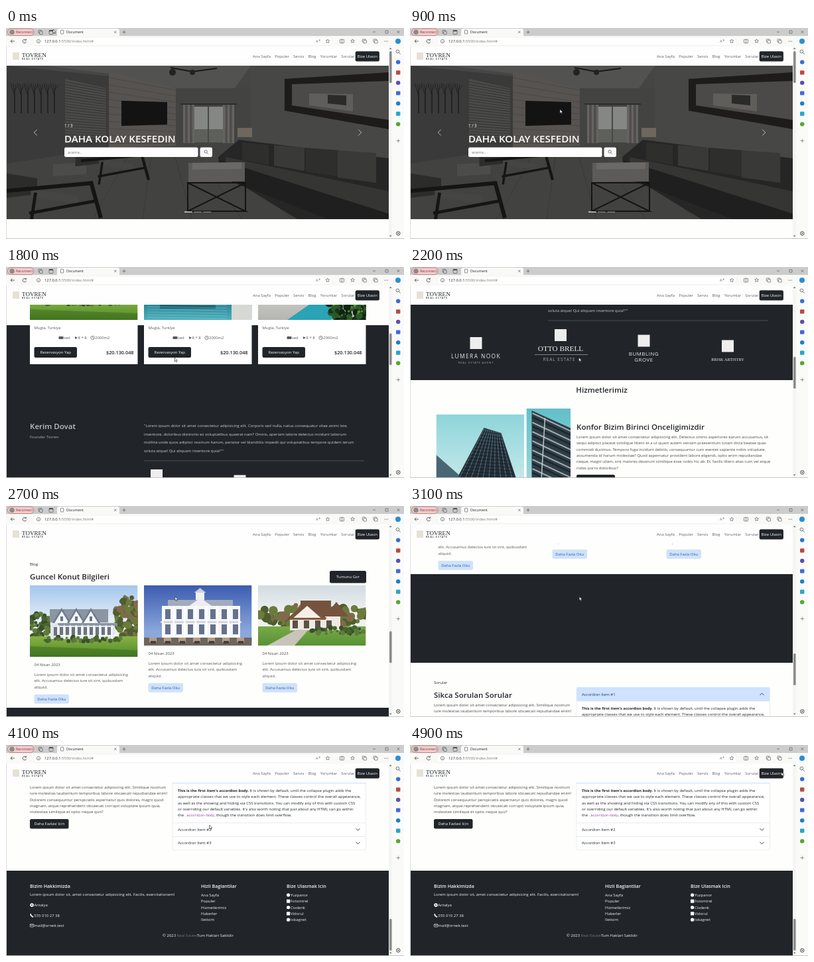
Animation of 600x319 px, one loop 5000 ms. Source, as an HTML page with a canvas:

```html
<!DOCTYPE html>
<html lang="tr">
<head>
<meta charset="utf-8">
<title>Document</title>
<style>
html, body { margin: 0; width: 100%; height: 100%; overflow: hidden; background: #fefefc; }
canvas { display: block; width: 600px; height: 319px; }
</style>
</head>
<body>
<canvas id="stage"></canvas>
<script>
const W = 600, H = 319, LOOP = 5000, STEP = 100;
const canvas = document.getElementById('stage');
const dpr = window.devicePixelRatio || 1;
canvas.width = W * dpr;
canvas.height = H * dpr;
const g = canvas.getContext('2d');

const SANS = '"Open Sans", "Noto Sans", sans-serif';
const SERIF = '"Liberation Serif", "Noto Serif", serif';
const MONO = '"Liberation Mono", monospace';
const INK = '#212529', SOFT = '#45494d', LINK = '#123c7c';
const GREEN = ['#49642f', '#5f7c3c', '#39502a'], AUTUMN = ['#6a7b3c', '#82694a', '#4d5f2e'], SHADE = ['#17331a', '#2c5a24', '#0f2412'];
const BODY = 5.95, LEAD = 9.35;
const cols = [36, 208, 380];

// [time, scroll offset]
const scrollKeys = [[900, 0], [1300, 161], [1800, 390], [2200, 602], [2700, 921], [3500, 1325], [3600, 1360]];
// [time, x, y]
const mouseKeys = [[500, 71, 2], [900, 226, 123], [1300, 226, 123], [1600, 254, 137], [4000, 256, 137], [4600, 560, 41]];

function track(keys, t) {
  let i = 1;
  while (i < keys.length - 1 && keys[i][0] < t) i++;
  const a = keys[i - 1], b = keys[i];
  const k = Math.max(0, Math.min(1, (t - a[0]) / (b[0] - a[0])));
  return a.slice(1).map((v, n) => v + (b[n + 1] - v) * k);
}

function rect(c, x, y, w, h) { g.fillStyle = c; g.fillRect(x, y, w, h); }
function round(c, x, y, w, h, r = 2.3, edge) {
  g.beginPath(); g.roundRect(x, y, w, h, r);
  if (c) { g.fillStyle = c; g.fill(); }
  if (edge) { g.strokeStyle = edge; g.lineWidth = 0.6; g.stroke(); }
}
function path(pts) {
  g.beginPath();
  for (let i = 0; i < pts.length; i += 2) g.lineTo(pts[i], pts[i + 1]);
}
function poly(c, ...pts) { path(pts); g.fillStyle = c; g.fill(); }
function line(c, w, ...pts) { path(pts); g.strokeStyle = c; g.lineWidth = w; g.stroke(); }
function dot(c, x, y, r) { g.beginPath(); g.arc(x, y, r, 0, 7); g.fillStyle = c; g.fill(); }
function ring(c, x, y, r, w = 0.7) { g.beginPath(); g.arc(x, y, r, 0, 7); g.strokeStyle = c; g.lineWidth = w; g.stroke(); }
function fade(y0, y1, ...cs) {
  const f = g.createLinearGradient(0, y0, 0, y1);
  cs.forEach((c, i) => f.addColorStop(i / (cs.length - 1), c));
  return f;
}
// a wall in perspective: the right edge is moved by top and bottom
function slab(c, x, y, w, h, top = 0, bottom = top) { poly(c, x, y, x + w, y + top, x + w, y + h + bottom, x, y + h); }
function gable(c, x, y, half, h) { poly(c, x - half, y, x, y - h, x + half, y); }
function repeat(n, fn) { for (let i = 0; i < n; i++) fn(i); }
function grid(c, x, y, nx, ny, dx, dy, w, h) { repeat(nx * ny, i => rect(c, x + i % nx * dx, y + Math.floor(i / nx) * dy, w, h)); }
function leaves(colors, n, x, y, w, h, r) {
  let seed = n * 97 + 13;
  const rnd = () => (seed = (seed * 16807) % 2147483647) / 2147483647;
  repeat(n, i => {
    const a = rnd() * 6.283, d = Math.sqrt(rnd()) / 2;
    dot(colors[i % colors.length], x + w * (0.5 + Math.cos(a) * d), y + h * (0.5 + Math.sin(a) * d), r * (0.5 + rnd() * 0.7));
  });
}
function photo(x, y, w, h, draw) {
  g.save();
  g.beginPath(); g.rect(x, y, w, h); g.clip();
  g.translate(x, y);
  draw(w, h);
  g.restore();
}

// y is the middle of the capitals; returns the right end
function text(s, x, y, { size = BODY, color = INK, weight = 400, align = 'left', font = SANS, space = 0 } = {}) {
  g.font = `${weight} ${size}px ${font}`;
  g.letterSpacing = space + 'px';
  g.textAlign = align;
  g.fillStyle = color;
  g.fillText(s, x, y + size * 0.35);
  return x + g.measureText(s).width;
}
function lines(list, x, y, step = LEAD, style) { list.forEach((s, i) => text(s, x, y + i * step, style)); }
function title(s, x, y, o = {}) { text(s, x, y, { size: 11.55, weight: 600, ...o }); }
function button(s, x, y, w, h = 14.5, back = INK, color = '#fff') {
  round(back, x, y, w, h);
  text(s, x + w / 2, y + h / 2, { color, align: 'center' });
}
function glass(x, y, r, c = SOFT) {
  ring(c, x - 0.6, y - 0.6, r);
  line(c, 0.8, x + r * 0.5, y + r * 0.5, x + r * 1.5, y + r * 1.5);
}
function chevron(x, y, turn, size, c = INK) {
  g.save(); g.translate(x, y); g.rotate(turn * Math.PI / 2);
  line(c, 0.9, -size, -size / 2, 0, size / 2, size, -size / 2);
  g.restore();
}

function farmhouse(w, h) {
  rect(fade(0, 60, '#a3c6ee', '#eef3f8'), 0, 0, w, h);
  leaves(AUTUMN, 110, 128, 16, 42, 64, 5);
  leaves(GREEN, 60, -10, 42, 42, 38, 4);
  rect(fade(78, h, '#86b043', '#4f8a28'), 0, 77, w, h);
  slab('#8b95a3', 30, 36, 88, 24);
  rect('#e2e6ec', 31, 56, 97, 25);
  repeat(3, i => {
    const x = 48 + i * 22;
    gable('#717d8d', x, 57, 14, 23);
    gable('#f6f7f8', x, 57, 11, 18);
    rect('#66758a', x - 2, 47, 4, 7);
  });
  slab('#8b97a5', 42, 57, 90, 4);
  grid('#6c757f', 36, 63, 10, 1, 9, 0, 5, 13);
  grid('#fff', 42, 60, 10, 1, 9, 0, 1.4, 21);
  rect('#fff', 42, 75, 88, 1.2);
  leaves(GREEN, 50, 16, 77, 126, 9, 3);
  slab('rgba(30,70,15,.3)', 0, 92, w, h, 6);
}
function villa(w, h) {
  rect(fade(0, 76, '#4f95da', '#c2def3'), 0, 0, w, h);
  leaves(GREEN, 30, -8, 44, 30, 30, 4);
  rect('#dfe3e6', 108, 4, 20, 72);
  repeat(2, i => {
    const y = 12 + i * 28;
    rect('#56656e', 22, y + 6, 88, 26);
    slab('#a05a48', 24, y + 4, 84, 8, 0, -2);
    slab('#fafafa', 14, y - 2, 122, 7, -2, 0);
    grid('#f5f5f5', 22, y + 4, 4, 1, 27, 0, 3, 26);
  });
  rect('#dfe3e5', 128, 44, 34, 30);
  repeat(8, i => rect('#9ba3a7', 130 + i * 4, 70 - i * 4, 9, 1.2));
  rect('#dad9d3', 0, 70, w, 6);
  rect(fade(74, h, '#1b7484', '#4fb0bd'), 0, 75, w, h);
  slab('rgba(10,70,85,.55)', 24, 75, 84, 16);
  slab('#d6d8d3', 132, 75, 30, 34);
  repeat(7, i => line('rgba(200,240,244,.35)', 0.8, 5, 80 + i * 4, 125, 82 + i * 4));
}
function terrace(w, h) {
  rect(fade(0, 62, '#8bb8e8', '#eef3f8'), 0, 0, w, h);
  leaves(GREEN, 40, -8, 42, 55, 24, 4);
  repeat(2, i => { line('#6d614f', 1, 14 + i * 16, 60, 14 + i * 16, 32); leaves(GREEN, 14, 7 + i * 16, 25, 14, 9, 2.5); });
  slab('#e9eaea', 44, 30, 72, 36, -4, 0);
  slab('#fff', 40, 29, 84, 5, -4);
  rect('#48545a', 52, 38, 60, 25);
  grid('#d4d7d7', 52, 36, 6, 1, 12, 0, 1.5, 28);
  rect(fade(62, h, '#d3d2cd', '#b4b5b0'), 0, 63, w, h);
  poly('#2aa3b5', 84, 80, 122, 88, 110, h, 44, h);
  leaves(SHADE, 190, 106, 44, 62, 74, 5);
  leaves(['#5c9438'], 40, 110, 50, 52, 56, 1.6);
}
function colonial(w, h) {
  rect(fade(0, 70, '#3c5cb0', '#8ba7dc'), 0, 0, w, h);
  rect('#f0f1f4', 78, 10, 13, 16);
  gable('#cdd0d8', 84.5, 11, 9, 7);
  slab('#a4abb9', 36, 22, 98, 12);
  gable('#eceef2', 85, 31, 17, 12);
  rect('#f5f6f8', 27, 31, 118, 49);
  grid('#65718d', 32, 36, 7, 2, 17, 23, 8, 15);
  rect('#d3d7df', 25, 54, 122, 3);
  grid('#fff', 27, 31, 8, 1, 16.5, 0, 2.5, 49);
  rect('#6c665f', 0, 79, w, 12);
  grid('#b49b85', 8, 79, 8, 1, 22, 0, 11, 7);
  grid('#473d3a', 10, 84, 8, 1, 22, 0, 8, 4);
}
function chalet(w, h) {
  rect(fade(0, 40, '#d2dbe1', '#eef1f0'), 0, 0, w, h);
  leaves(AUTUMN, 120, -10, 29, 182, 34, 6);
  rect(fade(60, h, '#7cab48', '#579235'), 0, 62, w, h);
  rect('#eeeae2', 48, 42, 76, 26);
  slab('#76533f', 64, 23, 46, 24);
  gable('#76533f', 118, 47, 18, 22);
  gable('#76533f', 74, 50, 30, 26);
  gable('#f4f0e8', 74, 52, 24, 21);
  grid('#5c5147', 52, 53, 4, 1, 17, 0, 8, 12);
  rect('#86583c', 48, 49, 54, 3);
  poly('#c9c4b9', 58, 67, 76, 67, 55, h, 14, h);
  leaves(GREEN, 45, 80, 63, 80, 12, 3.5);
}
function tower(w, h) {
  rect(fade(0, h, '#8ed5da', '#d7eff0'), 0, 0, w, h);
  poly('#243039', 72, 20, 98, 28, w, h, 12, h);
  repeat(10, i => line('#7799a6', 0.7, 73 + i * 2.6, 21 + i * 0.7, 16 + i * 12, h));
  repeat(22, i => line('rgba(10,18,25,.6)', 1, 70 - i * 2.6, 26 + i * 5, 98 + i * 1.4, 30 + i * 5));
  slab('#496773', 0, 61, 34, h, 30);
}
function facade(w, h) {
  rect(fade(0, h, '#61bfc9', '#b3e0e2'), 0, 0, w, h);
  slab('#303d45', 8, 3, w, h, 30);
  repeat(11, i => repeat(2, k => line(k ? '#18242b' : '#9faeb1', 2, 9, 7 + i * 14 + k * 6, w, 34 + i * 14 + k * 6)));
  line('#bccacc', 1.5, 28, 14, 20, h);
}

function chair(x, y, k) {
  g.save(); g.translate(x, y); g.scale(k, k);
  slab('#2c2c2b', -50, -22, 50, 34, 8, -6);
  slab('#454544', -8, 0, 60, 10, 8);
  line('#151515', 5, -40, 2, 68, -8, 80, 36);
  line('#151515', 4, -10, 30, 76, 14);
  line('#151515', 4, -2, 4, -8, 44);
  g.restore();
}
function room(w, h) {
  rect(fade(0, h, '#474747', '#3d3d3d', '#323232'), 0, 0, w, h);
  poly('#525251', 60, 0, 368, 0, 344, 34, 255, 34, 154, 12);
  slab('#3a3a3a', 0, 0, 157, 150, 16, -24);
  slab('#4b4b4a', 88, 20, 62, 98, 14, -10);
  repeat(22, i => line('#393938', 1.4, 88, 24 + i * 4.2, 150, 36 + i * 3.7));
  slab('#565350', 154, 8, 101, 122, 26, -9);
  repeat(10, i => line('#474440', 0.7, 154, 18 + i * 11, 255, 37 + i * 9));
  slab('#131313', 173, 53, 69, 38, 2, -2);
  rect('#434342', 255, 34, 114, 90);
  rect('#858784', 280, 62, 50, 36);
  rect('#5d605b', 280, 96, 50, 20);
  line('#484846', 2, 304, 62, 304, 116);
  line('#242424', 1.4, 262, 58, 347, 58);
  repeat(2, i => repeat(5, n => slab(n % 2 ? '#4f4e4c' : '#656461', 266 + i * 60 + n * 3.4, 59, 3.4, 58)));
  slab('#474746', 368, 0, 208, 122, 0, 46);
  slab('#1d1c1b', 419, 20, 157, 48, -10, 28);
  slab('#4b4a48', 430, 28, 146, 32, -5, 22);
  slab('#605e5a', 456, 42, 66, 18, 1, 9);
  slab('#2a2a29', 484, 44, 28, 13, 1, 3);
  repeat(7, i => repeat(4, n => line('#222', 0.9, 12 + i * 10, 72, 12 + i * 10, 46 - n * 3, 6 + i * 10 + n * 4, 26 + n)));
  line('#191919', 2, 247, 3, 280, 9, 317, 4);
  repeat(2, i => dot('#222', 250 + i * 30, 10, 5 - i));
  poly('#424241', 0, 148, 157, 124, 352, 118, 460, h, 0, h);
  repeat(5, i => line('#363636', 0.7, 190 + i * 30, 124, 130 + i * 75, h));
  slab('#6f675c', 348, 94, 22, 14);
  // sofa
  poly('#262626', 319, 138, 350, 112, 577, 140, 577, h, 438, h, 321, 160);
  slab('#353534', 330, 138, 247, 18, 52, 68);
  slab('#1f1f1f', 320, 142, 257, 26, 82, 100);
  repeat(4, i => slab(i % 2 ? '#393938' : '#2e2e2d', 355 + i * 48, 116 + i * 4, 40 + i * 6, 26 + i * 5, 4, 8));
  // coffee table
  slab('#5c5b59', 274, 147, 85, 29, -1);
  slab('#6a6966', 280, 147, 74, 10, -1);
  repeat(2, i => line('#141414', 2, 273 + i * 87, 177, 360 - i * 87, 220, 273, 220 - i * 43, 360, 220 - i * 43));
  line('#141414', 2, 273, 177, 273, 220); line('#141414', 2, 360, 177, 360, 220);
  slab('#4c4c4a', 70, 149, 50, 18, -3);
  chair(146, 142, 0.85);
  chair(46, 187, 1.2);
}

function hero() {
  photo(1, 57, 576, 232, room);
  text('1 / 3', 88, 147.5, { color: '#fff', size: 6.2 });
  title('DAHA KOLAY KESFEDIN', 88, 168, { size: 15.1, color: '#fff' });
  round('#fefefe', 88, 180.5, 201.5, 14.5);
  text('arama..', 93, 187.5, { color: '#6c757d' });
  round('#f8f9fa', 292.5, 180.5, 18.5, 14.5);
  glass(301.8, 187.5, 2.1);
  chevron(44.5, 158, 1, 4.5, '#c9c9c9');
  chevron(533.5, 158, -1, 4.5, '#c9c9c9');
  repeat(3, i => rect(i ? '#929292' : '#fff', 269 + i * 14.2, 277.5, 11.7, 1.2));
}

function popular() {
  rect(INK, 1, 478, 576, 295);
  text('Populer', 36, 333);
  title('Populer Rezidanslarimiz', 36, 352);
  text('Tumunu Kesfedin', 482, 352.5, { weight: 600, size: 5.75 });
  line(INK, 0.8, 534, 352, 541.5, 352);
  chevron(541, 352, -1, 1.8);
  [farmhouse, villa, terrace].forEach((pic, i) => {
    const x = cols[i], c = '#55595d';
    rect('#fff', x, 362, 162.5, 175);
    photo(x, 362, 162.5, 108, pic);
    text('Mugla, Turkiye', x + 6.5, 482, { color: c });
    round(c, x + 43.5, 495, 6.5, 4, 0.8);
    text('bed', x + 50, 497, { color: c });
    poly(c, x + 68, 495, x + 72, 497, x + 68, 499);
    text('8 * 8', x + 72.5, 497, { color: c });
    ring(c, x + 94.5, 497, 2.7);
    line(c, 0.6, x + 94.5, 495, x + 94.5, 497, x + 96, 498);
    text('2000m2', x + 98, 497, { color: c });
    button('Rezervasyon Yap', x + 6.5, 511, 64.5, 16);
    text('$20.130.048', x + 156.5, 519, { size: 7.3, weight: 600, align: 'right' });
  });
}

function quote() {
  title('Kerim Dovat', 36, 631, { color: '#c1c3c4' });
  text('Founder Tovren', 36, 647, { color: '#adb0b2' });
  lines(['"Lorem ipsum dolor sit amet consectetur adipisicing elit. Corporis sed nulla, natus consequatur vitae animi iste,',
    'inventore, doloribus distinctio ex voluptatibus quaerat nam? Omnis, aperiam labore delectus incidunt laborum',
    'mollitia unde quos adipisci nostrum harum, pariatur vel blanditiis impedit qui voluptatibus tempore quidem terum',
    'soluta atque! Qui aliquam inventore quia?""'], 208, 630, 12.5, { color: '#cdcfd0', weight: 500 });
  rect('#565a5d', 208, 682.6, 332, 0.8);
}

function partner(x, y, name, sub, style) {
  const mid = { color: '#eee', align: 'center' };
  rect('#eee', x - 9, y - 29, 18, 18);
  text(name, x, y, { ...mid, size: 8.4, ...style });
  text(sub, x, y + 9, { ...mid, color: '#a6a8aa', size: 4.3, space: 0.8 });
}
function partners() {
  partner(99.5, 135, 'LUMERA NOOK', 'REAL ESTATE AGENT', { space: 1.4 });
  partner(227, 123, 'OTTO BRELL', '', { size: 11.3, font: SERIF });
  rect('#bbb', 188, 132, 80, 0.6);
  text('REAL ESTATE', 225, 139.5, { color: '#a6a8aa', size: 6.5, space: 1, align: 'center' });
  partner(352.5, 131.5, 'BUMBLING', '', { size: 7.8, space: 0.6 });
  text('GROVE', 352.5, 140, { color: '#eee', size: 7.8, space: 0.6, align: 'center' });
  partner(479, 139.5, 'BRISK ARTISTRY', '', { size: 6.2, font: SERIF });
}

function services() {
  title('Hizmetlerimiz', 289, 186, { align: 'center' });
  photo(39.5, 223, 132.5, 133, tower);
  photo(175.5, 214, 66.5, 150, facade);
  title('Konfor Bizim Birinci Onceligimizdir', 251, 241.5);
  lines(['Lorem ipsum dolor sit amet consectetur adipisicing elit. Delectus omnis asperiores earum accusamus, sit',
    'sequi adipisci placeat similique libero et a ut quam autem veniam praesentium totam dicta beatae quas',
    'commodi ducimus. Tempora fuga incidunt debitis, consequuntur cum eveniet sapiente nobis voluptate,',
    'assumenda id harum molestiae? Quod aspernatur provident labore eligendi, optio enim repudiandae',
    'neque, magni ullam, sint maiores deserunt similique esse nobis hic ab. Et, facilis libero alias cum vel atque',
    'nobis porro doloribus?'], 251, 257, LEAD, { color: SOFT });
  button('Daha Fazlasi Icin', 251, 314, 58);
}

function blog() {
  text('Blog', 36, 88);
  title('Guncel Konut Bilgileri', 36, 106.5);
  button('Tumunu Gor', 488, 98, 55, 18.5);
  [farmhouse, colonial, chalet].forEach((pic, i) => {
    const x = cols[i], h = i ? 91 : 108, y = 120 + h;
    photo(x, 120, 162.5, h, pic);
    text('04 Nisan 2023', x + 6.5, y + 11.5, { color: SOFT });
    lines(['Lorem ipsum dolor sit amet consectetur adipisicing', 'elit. Accusamus delectus iure sit sint, quibusdam', 'aliquid.'],
      x + 6.5, y + 27, LEAD, { color: '#55595d' });
    button('Daha Fazla Oku', x + 6.5, y + 56.8, 52.5, 14, '#cfe2fb', '#2a5fae');
  });
  rect(INK, 1, 305, 576, 134);
}

function faq() {
  text('Sorular', 36, 65);
  title('Sikca Sorulan Sorular', 36, 83.5);
  lines(['Lorem ipsum dolor sit amet consectetur adipisicing elit. Similique nostrum',
    'iure molestias laudantium temporibus labore obcaecati repudiandae enim!',
    'Dolorem consequuntur perspiciatis aspernatur quis dolores, magni quod',
    'magnam, atque reprehenderit obcaecati corrupti voluptate ipsum quia,',
    'molestiae similique et optio neque quo?'], 36, 99, LEAD, { color: SOFT });
  button('Daha Fazlasi Icin', 36, 147, 58.5);

  round('#fff', 251, 72, 291.5, 122, 2.4, '#dee2e6');
  round('#cfe2ff', 251.2, 72.2, 291, 21, [2.4, 2.4, 0, 0]);
  text('Accordion Item #1', 259, 82.8, { color: LINK });
  chevron(530.5, 82.5, 2, 3, LINK);
  const x = text("This is the first item's accordion body.", 259, 104, { weight: 700, size: 5.7 });
  text(' It is shown by default, until the collapse plugin adds the', x, 104);
  lines(['appropriate classes that we use to style each element. These classes control the overall appearance,',
    'as well as the showing and hiding via CSS transitions. You can modify any of this with custom CSS',
    "or overriding our default variables. It's also worth noting that just about any HTML can go within"], 259, 104 + LEAD);
  const y = 104 + 4 * LEAD;
  const a = text('the ', 259, y);
  const b = text('.accordion-body', a, y, { size: 4.9, color: '#8a3f96', font: MONO });
  text(', though the transition does limit overflow.', b, y);
  repeat(2, i => {
    const top = 152.5 + i * 20.5;
    rect('#dee2e6', 251, top, 291.5, 0.7);
    text('Accordion Item #' + (i + 2), 259, top + 10.4);
    chevron(530.5, top + 10.2, 0, 3);
  });
}

function footer() {
  const white = { color: '#f3f4f5' }, head = { ...white, size: 7.1, weight: 600 };
  rect(INK, 1, 225, 576, 130);
  ['Bizim Hakkimizda', 'Hizli Baglantilar', 'Bize Ulasmak Icin'].forEach((s, i) => text(s, i ? 165 + i * 129 : 36, 249, head));
  text('Lorem ipsum dolor sit, amet consectetur adipisicing elit. Facilis, exercitationem!', 36, 261.3, white);
  ring('#fff', 39, 277, 1.8, 1.8);
  line('#fff', 1.7, 37, 290.3, 37.8, 293, 41, 295.2);
  round(null, 36.3, 305.8, 5.5, 4.3, 0.7, '#fff');
  chevron(39, 307.3, 0, 2.2, '#fff');
  lines(['Antalya', '555 010 27 38', 'mail@ornek.test'], 42.3, 277, 15.6, white);
  lines(['Ana Sayfa', 'Populer', 'Hizmetlerimiz', 'Haberler', 'Iletisim'], 294, 261.8, LEAD, white);
  const social = ['Yuzpanor', 'Fotomirel', 'Civdenk', 'Vidorul', 'Isbagnet'];
  lines(social, 429, 261.8, LEAD, white);
  social.forEach((s, i) => round('#fff', 423, 259.2 + i * LEAD, 5.2, 5.2, i % 2 ? 0.4 : 2.6));
  let x = text('© 2023 ', 236, 323.3, white);
  x = text('Real Estate', x, 323.3, { color: '#6c757d' });
  text('Tum Haklari Saklidir', x, 323.3, white);
}

function navbar() {
  rect('#fefefe', 1, 28, 576, 29);
  rect('#e6e1d4', 10, 37, 10, 11);
  text('TOVREN', 24, 41, { size: 9.1, font: SERIF });
  text('REAL ESTATE', 24, 46.7, { size: 3.5, weight: 600, space: 1.1 });
  let x = 372;
  for (const s of ['Ana Sayfa', 'Populer', 'Servis', 'Blog', 'Yorumlar', 'Sorular']) x = text(s, x, 43, { color: '#5c6064' }) + 6.1;
  button('Bize Ulasin', 526.7, 35.2, 36.2, 15.4);
}

function cross(x, y, r, c, turn = 0) {
  g.save(); g.translate(x, y); g.rotate(turn);
  line(c, 0.6, -r, 0, r, 0); line(c, 0.6, 0, -r, 0, r);
  g.restore();
}
function star(x, y, r, c) {
  const pts = [];
  repeat(11, i => {
    const a = (i / 5 - 0.5) * Math.PI, q = i % 2 ? r * 0.5 : r;
    pts.push(x + q * Math.cos(a), y + q * Math.sin(a));
  });
  line(c, 0.6, ...pts);
}
function pages(x, y, c, back) {
  round(null, x, y, 4.6, 4.6, 0.8, c);
  round(back, x + 1.6, y + 1.6, 4.6, 4.6, 0.8, c);
}

function chrome(scroll) {
  const c = '#444', tabs = '#cbcccb', bar = '#f9f9f7';
  rect(tabs, 0, 0, W, 12);
  rect(bar, 0, 12, W, 16);
  round('#ecd0d0', 2.5, 1, 39.5, 10.5, 5.2, '#b8474b');
  dot('#8b8b8b', 9, 6.2, 3.8);
  text('Reconnect', 15, 6.3, { size: 5.2, color: '#a3282d' });
  pages(49, 3.3, c, tabs);
  round(null, 65, 3.5, 6, 6, 1, c); rect(c, 65, 3.5, 6, 1.6);
  round(bar, 77, 1, 94, 13, [3, 3, 0, 0]);
  round('#fff', 82.5, 3.3, 4.2, 5.6, 0.6, c);
  text('Document', 91, 6.4, { size: 5.3 });
  cross(164.8, 6.2, 2.3, c, Math.PI / 4);
  cross(178, 6.2, 2.5, c);
  line(c, 0.6, 553, 6, 557, 6);
  round(null, 572, 4, 4, 4, 0.4, c);
  cross(591.5, 6, 2.6, c, Math.PI / 4);

  round('#fff', 41, 14, 451, 12.5, 5, '#ececea');
  line(c, 0.8, 13, 20, 7, 20); chevron(8.3, 20, 1, 2.5, c);
  g.beginPath(); g.arc(28, 20, 2.8, 0.3, 5.5); g.strokeStyle = c; g.lineWidth = 0.8; g.stroke();
  line(c, 0.8, 30.5, 16.5, 30.3, 18.7, 28.3, 18.6);
  ring(c, 49, 20, 2.7, 0.6); rect(c, 48.7, 19.5, 0.7, 2);
  const x = text('127.0.0.1', 58, 20, { size: 5.8, color: '#222' });
  text(':5500/index.html#', x, 20, { size: 5.8, color: '#777' });
  text('A', 467, 20, { size: 5.5, color: '#666' });
  text('あ', 471, 18.5, { size: 3, color: '#666', font: '"Noto Sans CJK JP", sans-serif' });
  star(485, 20, 3, c);
  round(null, 503.5, 17.3, 6, 5.5, 0.7, c); line(c, 0.6, 506.5, 17, 506.5, 23);
  star(522.5, 19.8, 3, c);
  pages(537.3, 16.8, c, bar);
  pages(554, 16.8, c, bar);
  repeat(3, i => dot(c, 571 + i * 2.2, 20, 0.6));
  dot('#2b8fd0', 591, 20, 4);

  // side panel
  rect('#fafaf8', 582.5, 28, 18, 291);
  glass(591, 36, 2.4);
  ['#3470cf', '#b64b43', '#5a50a8', '#4169d8', '#1d7fd0', '#28a6c4', '#58a534']
    .forEach((k, i) => round(k, 588, 48.6 + i * 15.6, 6.4, 6.2, i % 2 ? 1 : 3));
  cross(591.3, 170.5, 2.8, '#555');
  ring(c, 591.3, 310.5, 2.8, 1); dot(c, 591.3, 310.5, 1);

  // scrollbar
  rect('#f5f5f4', 577, 28, 5.5, 290);
  gable('#777', 579.7, 32, 1.9, 2.2);
  gable('#777', 579.7, 313.5, 1.9, -2.2);
  round('#8b8b8b', 578, 35 + scroll / 5.97, 3.6, 48, 1.6);
  rect('#c5c5c4', 0, 318, W, 1);
  rect('#d5d5d4', 0, 28, 0.8, 291);
}

function pointer(x, y) {
  g.save(); g.translate(x, y); g.lineJoin = 'round';
  path([0, 0, 0, 5.8, 1.4, 4.6, 2.4, 6.8, 3.3, 6.4, 2.4, 4.3, 4.2, 4.2]);
  g.closePath();
  g.fillStyle = '#fff'; g.fill();
  g.strokeStyle = '#222'; g.lineWidth = 0.6; g.stroke();
  g.restore();
}

function at(dy, ...parts) {
  g.save(); g.translate(0, dy);
  parts.forEach(p => p());
  g.restore();
}

function draw(t) {
  const [scroll] = track(scrollKeys, t);
  g.setTransform(dpr, 0, 0, dpr, 0, 0);
  rect('#fefefc', 0, 0, W, H);
  g.save();
  g.beginPath(); g.rect(1, 57, 576, 261); g.clip();
  at(-scroll, hero, popular, quote);
  at(602 - scroll, partners, services);
  at(921 - scroll, blog);
  at(1325 - scroll, faq, footer);
  g.restore();
  navbar();
  chrome(scroll);
  pointer(...track(mouseKeys, t));
}

let shown = -1;
const start = performance.now();
function tick() {
  const t = Math.floor(((performance.now() - start) % LOOP) / STEP) * STEP;
  if (t !== shown) draw(shown = t);
  requestAnimationFrame(tick);
}
tick();
</script>
</body>
</html>
```
